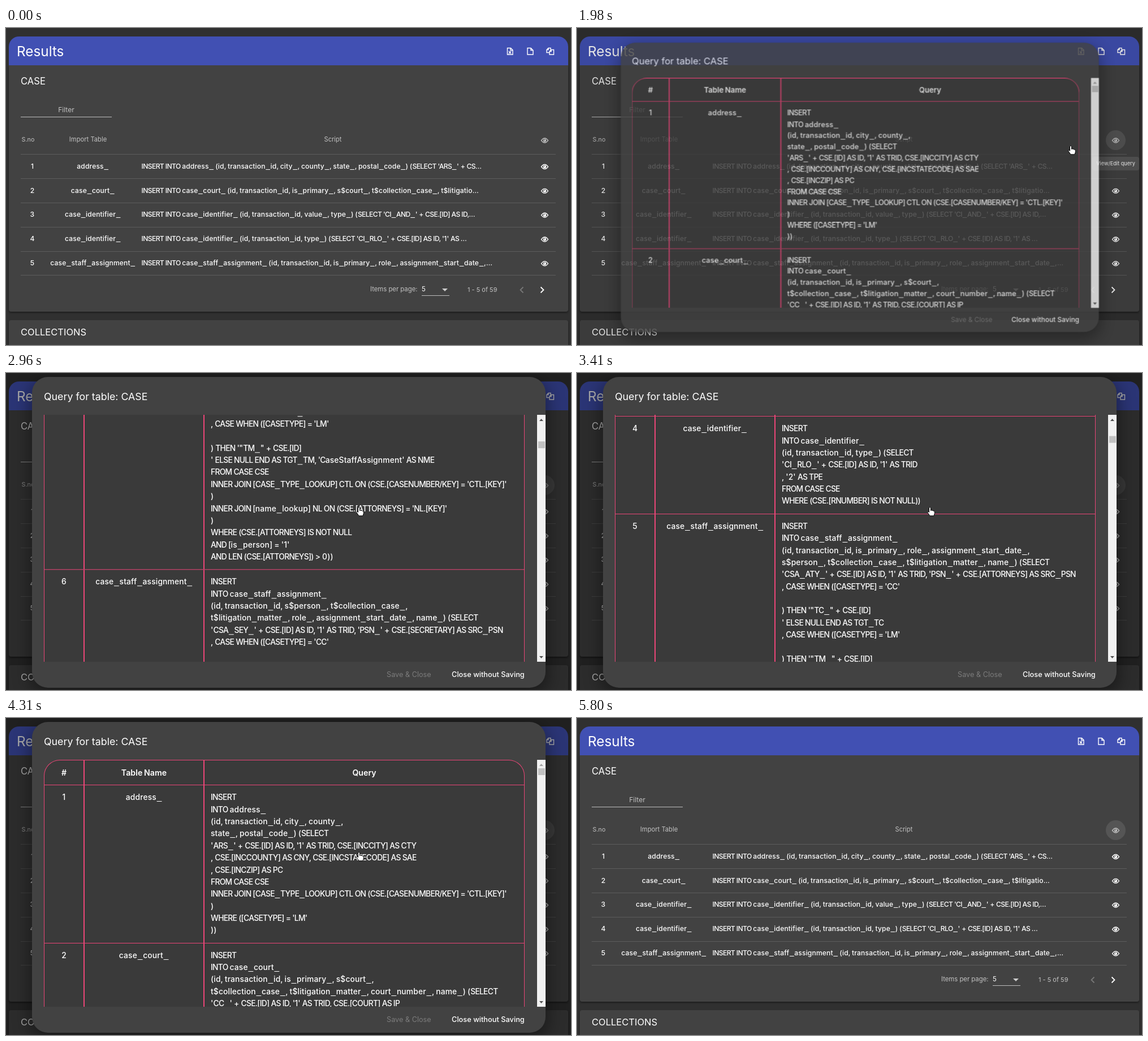
Write an HTML page that moves like this. It is 999x561 px and loops after 6380 ms.

```html
<!DOCTYPE html>
<html lang="en">
<head>
<meta charset="utf-8">
<title>Query viewer</title>
<style>
  html, body { margin: 0; width: 100%; height: 100%; overflow: hidden; background: #303030; }
  body { position: relative; color: #fff; font-family: Inter, "Open Sans", sans-serif; }
  div, svg { position: absolute; box-sizing: border-box; }
  .t { line-height: 1; white-space: pre; transform: translateY(-50%); }
  .mid { transform: translate(-50%, -50%); }
  .sql { font-weight: 500; letter-spacing: .012em; word-spacing: -.06em; }
  .caps { letter-spacing: -.05em; word-spacing: 0; }
  .bar { margin: 0 .05em; letter-spacing: .18em; color: transparent;
    text-decoration: underline 1px #fff; text-underline-offset: .12em; text-decoration-skip-ink: none; }
  .card { left: 5px; width: 989px; background: #424242; box-shadow: 0 2px 3px #0006; }
  .rule { height: 1px; background: #5c5c5c; }
  svg { overflow: visible; }
  .line { fill: none; stroke: #fff; stroke-width: 1.4; }

  #ripple { left: 935px; top: 181px; width: 35px; height: 35px; border-radius: 50%; background: #ffffff1a; }
  #tip { left: 911px; top: 228px; width: 83px; height: 24px; border-radius: 4px; background: #565656; }
  #shade { inset: 0; background: #000; }
  #dialog { left: 46px; top: 7px; width: 908px; height: 550px; border-radius: 28px; background: #424242;
    box-shadow: 0 10px 30px 4px #0006; }
  #view { left: 21px; top: 67px; width: 872px; height: 437px; overflow: hidden; }
  #table { left: 0; top: 0; width: 850px; border: solid #ea4577; border-width: 1px 1px 0; border-radius: 28px 28px 0 0;
    background: #3a3a3a; overflow: hidden; }
  .row { position: relative; display: grid; grid-template-columns: 69px 212px 1fr; border-bottom: 1px solid #ea4577;
    font-size: 13.8px; line-height: 21.36px; text-align: center; white-space: pre; }
  .row > div { position: relative; padding: 11px 0; }
  .row > div + div { border-left: 2px solid #ea4577; }
  .row > div:last-child { padding-left: 11px; text-align: left; }
  .head.row > div { padding: 11px 0; text-align: center; font-weight: 600; font-size: 14.2px; letter-spacing: 0; }
  #hover { left: 283px; right: 0; top: 44px; height: 279px; background: #ea45775c; }
  #scroll { left: 893px; top: 67px; width: 15px; height: 437px; background: #f1f1f1; }
  #thumb { left: 2px; top: 15px; width: 12px; height: 12px; background: #c1c1c1; }
  #pill { left: 728px; top: 511px; width: 158px; height: 32px; border-radius: 16px; background: #4d4d4d; }
  #cursor { left: 0; top: 0; }
  #cursor path { fill: #fff; stroke: #000; stroke-width: 1; stroke-linejoin: round; }
</style>
</head>
<body>
<div class="card" style="top:66px;height:436px;border-radius:0 0 4px 4px"></div>
<div class="card" style="top:15px;height:51px;border-radius:18px 18px 0 0;background:#4150b3;box-shadow:none"></div>
<div class="card" style="top:517px;height:60px;border-radius:4px"></div>
<div id="page" style="inset:0"></div>
<div id="ripple"></div>
<svg id="icons" width="999" height="561">
  <g class="line">
    <path d="M886.500 35.500h6l3.500 3.500v8h-9.500zM892 35.500v4h4"/>
    <path d="M889 41l4 4.500M893 41l-4 4.500"/>
    <path d="M922 35.500h6l4 4v7.500h-10zM928 35.500v4h4"/>
    <path d="M961 43.500h-5v-5l3-3h4v3M959 35.500v3h-3M964 38.500h4.500v8.500h-7.500v-5.500zM964 38.500v3h-3"/>
  </g>
  <path d="M771 461h10l-5 5z" fill="#ccc"/>
  <path class="line" d="M914.500 458.500l-5 5 5 5" style="stroke:#777;stroke-width:1.800"/>
  <path class="line" d="M945.500 458.500l5 5-5 5" style="stroke-width:1.800"/>
</svg>
<div id="tip"><div class="t mid" style="left:41.500px;top:12px;font-size:9.200px">View/Edit query</div></div>
<div id="shade"></div>
<div id="dialog">
  <div id="view"><div id="table"><div id="hover"></div></div></div>
  <div id="scroll">
    <div id="thumb"></div>
    <svg width="15" height="437"><path id="up" d="M4 11l3.500-4 3.500 4z"/><path d="M4 427l3.500 4 3.500-4z" fill="#505050"/></svg>
  </div>
  <div id="pill"></div>
</div>
<svg id="cursor" width="20" height="22">
  <path id="arrow" d="M0 0v14l3.300-3 2.200 5 2.300-1-2.200-4.800h4.400z"/>
  <path id="hand" d="M-1.500 1.500q1.500-2 3 0v5l1-.6q1.500-.3 1.800.8 1.600-.6 2.100.7 1.800-.3 1.900 1.200v3.200l-1.500 4h-6.800l-4.200-6q0-2 1.600-1.400l1.100 1.100z"/>
</svg>
<script>
const LOOP = 6380;
const $ = id => document.getElementById(id);

// Capitals sit tighter and underscores run wider than the base face.
const rich = s => s
  .replace(/[A-Z][A-Z .,[\]\/'=()+]+/g, '<span class="caps">$&</span>')
  .replace(/_/g, '<span class="bar">_</span>');

function put(parent, x, y, size, html, cls = '', color = '#fff') {
  parent.insertAdjacentHTML('beforeend',
    `<div class="t ${cls}" style="left:${x}px;top:${y}px;font-size:${size}px;color:${color}">${html}</div>`);
}
const rule = (x, y, w, color = '#5c5c5c') => $('page').insertAdjacentHTML('beforeend',
  `<div class="rule" style="left:${x}px;top:${y}px;width:${w}px;background:${color}"></div>`);
const eye = (y, color) => $('icons').insertAdjacentHTML('beforeend',
  `<g transform="translate(952.5 ${y})"><path d="M-6 0Q0-8 6 0 0 8-6 0z" fill="none" stroke="${color}" stroke-width="1.4"/>
   <circle r="2.7" fill="${color}"/><circle cx="-.8" cy="-.9" r=".8" fill="#424242"/></g>`);

// Results page
const page = $('page'), soft = '#c2c2c2';
put(page, 19, 40.5, 24.3, 'Results');
put(page, 26, 94, 16.6, 'CASE');
put(page, 26, 538, 16.5, 'COLLECTIONS');
put(page, 106.5, 145, 12.1, 'Filter', 'mid', soft);
rule(26, 157, 161, '#bdbdbd');
put(page, 39, 198, 10.8, 'S.no', 'mid', soft);
put(page, 145, 198, 11.2, 'Import Table', 'mid', soft);
put(page, 578, 198, 11.1, 'Script', 'mid', soft);
eye(199, '#bbb');
rule(26, 223, 946);
[
  ['address_', "(id, transaction_id, city_, county_, state_, postal_code_) (SELECT 'ARS_' + CS…"],
  ['case_court_', '(id, transaction_id, is_primary_, s$court_, t$collection_case_, t$litigatio…'],
  ['case_identifier_', "(id, transaction_id, value_, type_) (SELECT 'CI_AND_' + CSE.[ID] AS ID,…"],
  ['case_identifier_', "(id, transaction_id, type_) (SELECT 'CI_RLO_' + CSE.[ID] AS ID, '1' AS …"],
  ['case_staff_assignment_', '(id, transaction_id, is_primary_, role_, assignment_start_date_,…']
].forEach(([name, script], i) => {
  const y = 244.7 + i * 42.85;
  put(page, 46.5, y, 12.2, i + 1, 'mid sql');
  put(page, 153.5, y, 12.1, rich(name), 'mid sql');
  put(page, 239.5, y, 12.1, rich(`INSERT INTO ${name} ${script}`), 'sql');
  eye(y + .8, '#fff');
  rule(26, Math.round(y + 21.3), 946);
});
put(page, 644, 463, 11.3, 'Items per page:', '', soft);
put(page, 735, 463, 11.5, '5');
rule(735, 473, 49, '#bdbdbd');
put(page, 816, 463, 11, '1 - 5 of 59', '', soft);

// Query dialog
const dialog = $('dialog');
put(dialog, 21, 35, 17.8, 'Query for table: CASE');
put(dialog, 627, 527, 12.7, 'Save &amp; Close', '', '#7c7c7c');
put(dialog, 742, 527, 12.8, '<span style="font-weight:500">Close without Saving</span>');

const addRow = (cells, cls = '') => $('table').insertAdjacentHTML('beforeend',
  `<div class="row sql ${cls}">${cells.map(c => `<div>${c}</div>`).join('')}</div>`);
const join = (left, right, key) => [`INNER JOIN [${left}] ${right} ON (CSE.[${key}] = '${right}.[KEY]'`, ')'];
const when = (type, code, tail = '') => [
  `, CASE WHEN ([CASETYPE] = '${type}'`, '', `) THEN '"${code}_" + CSE.[ID]`, `' ELSE NULL END AS TGT_${code}${tail}`];
const from = ['FROM CASE CSE'];
const lookup = join('CASE_TYPE_LOOKUP', 'CTL', 'CASENUMBER/KEY');
const targets = name => [...when('CC', 'TC'), ...when('LM', 'TM', `, '${name}' AS NME`), ...from, ...lookup];
const person = key => [...join('name_lookup', 'NL', key),
  `WHERE (CSE.[${key}] IS NOT NULL`, "AND [is_person] = '1'", `AND LEN (CSE.[${key}]) > 0))`];

addRow(['#', 'Table Name', 'Query'], 'head');
[
  ['address_', '(id, transaction_id, city_, county_,', 'state_, postal_code_) (SELECT',
    "'ARS_' + CSE.[ID] AS ID, '1' AS TRID, CSE.[INCCITY] AS CTY",
    ', CSE.[INCCOUNTY] AS CNY, CSE.[INCSTATECODE] AS SAE', ', CSE.[INCZIP] AS PC',
    ...from, ...lookup, "WHERE ([CASETYPE] = 'LM'", '))'],
  ['case_court_', '(id, transaction_id, is_primary_, s$court_,',
    't$collection_case_, t$litigation_matter_, court_number_, name_) (SELECT',
    "'CC_' + CSE.[ID] AS ID, '1' AS TRID, CSE.[COURT] AS IP",
    ", 'CUT_' + CSE.[COURT] AS SRC_CUT" + when('CC', 'TC')[0], ...targets('CaseCourt').slice(1),
    'WHERE (CSE.[COURT] IS NOT NULL))'],
  ['case_identifier_', '(id, transaction_id, value_, type_) (SELECT',
    "'CI_AND_' + CSE.[ID] AS ID, '1' AS TRID, CSE.[ANUMBER] AS VLE", ", '1' AS TPE",
    ...from, 'WHERE (CSE.[ANUMBER] IS NOT NULL))'],
  ['case_identifier_', '(id, transaction_id, type_) (SELECT',
    "'CI_RLO_' + CSE.[ID] AS ID, '1' AS TRID", ", '2' AS TPE",
    ...from, 'WHERE (CSE.[RNUMBER] IS NOT NULL))'],
  ['case_staff_assignment_', '(id, transaction_id, is_primary_, role_, assignment_start_date_,',
    's$person_, t$collection_case_, t$litigation_matter_, name_) (SELECT',
    "'CSA_ATY_' + CSE.[ID] AS ID, '1' AS TRID, 'PSN_' + CSE.[ATTORNEYS] AS SRC_PSN",
    ...targets('CaseStaffAssignment'), ...person('ATTORNEYS')],
  ['case_staff_assignment_', '(id, transaction_id, s$person_, t$collection_case_,',
    't$litigation_matter_, role_, assignment_start_date_, name_) (SELECT',
    "'CSA_SEY_' + CSE.[ID] AS ID, '1' AS TRID, 'PSN_' + CSE.[SECRETARY] AS SRC_PSN",
    ...targets('CaseStaffAssignment'), ...person('SECRETARY')]
].forEach(([name, ...lines], i) =>
  addRow([i + 1, rich(name), rich(['INSERT', 'INTO ' + name, ...lines].join('\n'))]));

// Each track holds a value from its time (ms) until the next one.
const sheet = document.head.appendChild(document.createElement('style'));
const tracks = {};
function track(id, prop, keys, value = v => v) {
  const steps = keys.map(([ms, ...v]) => `${ms / LOOP * 100}% { ${prop}: ${value(...v)} }`).join('\n');
  const name = `${id}-${prop}`;
  (tracks[id] ||= []).push(`${name} ${LOOP}ms step-end infinite`);
  sheet.textContent += `@keyframes ${name} {\n${steps}\n}\n#${id} { animation: ${tracks[id]} }\n`;
}
const move = (x, y) => `translate(${x}px, ${y}px)`;
const shown = (id, ...times) => track(id, 'visibility',
  [0, ...times].map((ms, i) => [ms, i % 2 ? 'visible' : 'hidden']));

// Evenly timed stops of one sweep of the pointer.
const sweep = (t0, t1, n, [x0, y0], [x1, y1]) => Array.from({ length: n }, (_, i) => {
  const k = i / (n - 1), e = k * k * (3 - 2 * k);
  return [Math.round(t0 + (t1 - t0) * k), x0 + (x1 - x0) * e, y0 + (y1 - y0) * e];
});
track('cursor', 'transform', [
  [0, 678, 454],
  ...sweep(100, 640, 6, [678, 454], [944, 198]),
  ...sweep(760, 980, 3, [850, 290], [602, 450]),
  ...sweep(1120, 1313, 3, [720, 360], [948, 200]),
  [1620, 950, 200],
  [1980, 873, 208], [2110, 735, 225], [2220, 660, 234], [2330, 637, 236],
  [2540, 624, 237],
  ...sweep(4510, 4940, 5, [630, 260], [846, 548]),
  [5060, 846, 546]
], move);
shown('cursor', 100, 5480);
shown('arrow', 100, 1217);
shown('hand', 1217, 5480);

track('tip', 'opacity', [[0, 0], [1313, .5], [1410, 1], [2110, .4], [2220, 0]]);
track('ripple', 'transform', [[0, 0], [1780, .6], [1840, .82], [1980, 1]], s => `scale(${s})`);
track('shade', 'opacity', [[0, 0], [1980, .1], [2110, .25], [2220, .32], [2330, .34],
  [5150, .28], [5260, .17], [5370, .09], [5480, .03], [5580, 0]]);
track('dialog', 'opacity', [[0, 0], [1980, .82], [2110, 1], [5150, .45], [5260, 0]]);
track('dialog', 'transform', [[0, .7], [1980, .931], [2110, 1]], s => `scale(${s})`);
shown('hover', 2110, 2540, 4510, 4725);
shown('pill', 4832, 5260);

const scroll = [[0, 0], [2540, 110], [2630, 330], [2770, 640], [2870, 960], [2960, 1252.7], [3080, 1340],
  [3300, 1190], [3400, 880], [3510, 540], [3610, 260], [3750, 90], [3840, 25], [3950, 0]];
track('table', 'transform', scroll, y => move(0, -y));
track('thumb', 'transform', scroll, y => move(0, y / 39));
track('up', 'fill', scroll, y => y ? '#505050' : '#a3a3a3');
</script>
</body>
</html>
```
